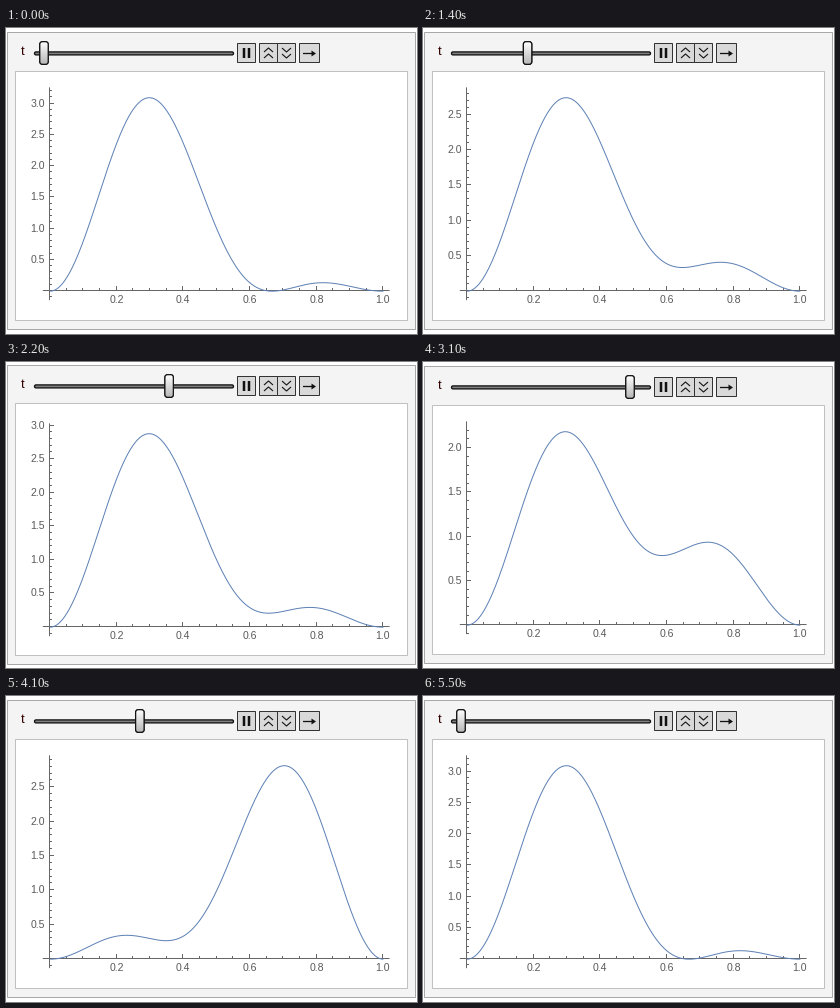
Write a matplotlib script that moves like this. It is 411x306 px and loops after 6000 ms.

```python
import math

import matplotlib.pyplot as plt
import numpy as np
from matplotlib.animation import FuncAnimation
from matplotlib.patches import FancyBboxPatch, Rectangle

# Lines already sit on pixel centres, so snapping would only move them.
plt.rcParams["path.snap"] = False

W, H, DPI = 411, 306, 64
PT = 72 / DPI                      # points per pixel

FRAMES, STEP_MS = 60, 100
HOLD = 4                           # still steps before the motion starts
STEPS = 51                         # moving steps, out and back

X0, Y0 = 43.5, 262.5               # plot origin in pixels
X_SCALE, PEAK = 333.4, 193.5       # pixels per unit of x, height of the curve
PAD = 0.05 * PEAK
CURVE_DX, CURVE_DY = 0.5, 0.7      # the curve is not aligned to the pixel grid

GREY, TEXT, CURVE, INK = "#666666", "#5a5a5a", "#5e81b5", "#111111"

fig = plt.figure(figsize=(W / DPI, H / DPI), dpi=DPI, facecolor="white")
ax = fig.add_axes([0, 0, 1, 1])
xs = np.linspace(0, 1, 401)


def slider_value(frame):
    """Position of the slider from 0 to 1; it runs out and back once."""
    k = frame - HOLD
    if not 0 < k < STEPS:
        return 0.0
    return (min(k, STEPS - k) - 0.9) / 24.6


def density(u):
    """Two lowest box states beating three times along the slider."""
    a, b = np.sin(np.pi * xs), np.sin(2 * np.pi * xs)
    return a**2 + b**2 + 2 * a * b * math.cos(6 * math.pi * u)


def line(x, y, color=GREY, width=1.0):
    ax.plot(x, y, color=color, lw=width * PT, solid_capstyle="butt")


def box(x0, y0, x1, y1, face, edge):
    ax.add_patch(Rectangle((x0, y0), x1 - x0, y1 - y0, fc=face, ec=edge, lw=PT))


def pill(x0, y0, x1, y1, radius, face, width, zorder=1):
    patch = FancyBboxPatch((x0, y0), x1 - x0, y1 - y0,
                           boxstyle=f"round,pad=0,rounding_size={radius}",
                           fc=face, ec=INK, lw=width * PT, zorder=zorder)
    return ax.add_patch(patch)


def label(x, y, text, size=10.5, color=TEXT, ha="center"):
    ax.text(x, y, text, fontsize=size * PT, color=color, ha=ha,
            va="baseline", family="Liberation Sans")


def pixel(v):
    return math.floor(v) + 0.5


def draw_slider(u, dy):
    label(15, 27 + dy, "t", 13, "#330000", "left")
    pill(28.5, 23.9 + dy, 227.5, 26.9 + dy, 1.5, "#808080", 1.3)
    cx = 38 + 180 * u
    left, right, top, bottom = cx - 4.2, cx + 4.2, 13.7 + dy, 36.3 + dy
    thumb = pill(left, top, right, bottom, 2.6, "#dddddd", 1.2, 3)
    shade = ax.imshow(np.linspace(1, 0.72, 24)[:, None], cmap="gray", vmin=0,
                      vmax=1, extent=(left, right, bottom, top),
                      aspect="auto", zorder=3.1)
    shade.set_clip_path(thumb)
    pill(left, top, right, bottom, 2.6, "none", 1.2, 3.2)


def draw_buttons(dy):
    for x0, x1 in ((231.5, 249.5), (253.5, 271.5), (271.5, 289.5), (293.5, 313.5)):
        box(x0, 15.5 + dy, x1, 34.5 + dy, "#d9d9d9", "#333333")
    mid = 25 + dy
    for x in (238, 243):
        line([x, x], [mid - 5, mid + 5], INK, 2.5)
    for cx, sign in ((262.5, 1), (280.5, -1)):
        for cy in (mid - 3, mid + 3):
            line([cx - 4.5, cx, cx + 4.5],
                 [cy + 2 * sign, cy - 2 * sign, cy + 2 * sign], INK, 1.1)
    line([297, 307], [mid + 0.5, mid + 0.5], INK, 1.3)
    ax.fill([305.5, 310, 305.5], [mid - 2.5, mid + 0.5, mid + 3.5],
            color=INK, lw=0)


def draw_plot(values, y0, scale):
    top, bottom = y0 - PEAK - PAD, y0 + PAD
    line([X0 - 6.7, X0 + 1.02 * X_SCALE], [y0, y0])
    line([X0, X0], [top, bottom])

    for i in range(21):
        x = pixel(X0 + i * 0.05 * X_SCALE)
        major = i % 4 == 0
        line([x, x], [y0, y0 - (4.5 if major else 2.5)])
        if major and i:
            label(x, y0 + 12.5, f"{i / 20:.1f}")

    first = -math.floor(PAD / scale * 10)
    last = math.floor((PEAK + PAD) / scale * 10)
    for i in range(first, last + 1):
        y = pixel(y0 - i * 0.1 * scale)
        major = i % 5 == 0
        line([X0, X0 + (4.5 if major else 2.5)], [y, y])
        if major and i:
            label(39, y + 3.5, f"{i / 10:.1f}", ha="right")

    line(X0 + CURVE_DX + xs * X_SCALE, y0 + CURVE_DY - values * scale, CURVE)


def draw(frame):
    ax.clear()
    ax.axis("off")
    u = slider_value(frame)
    values = density(u)
    scale = PEAK / values.max()

    # A label close to the axis end makes the panel a little taller.
    room = (PEAK + PAD) % (0.5 * scale)
    grow = max(0, round((6.65 - room) / 2))
    outer = max(0, grow - 1)

    box(1.5, 4.5 - outer, 409.5, 301.5 + outer, "#f4f4f4", "#a8a8a8")
    box(9.5, 43.5 - grow, 401.5, 292.5 + outer, "white", "#c0c0c0")
    draw_slider(u, -outer)
    draw_buttons(-outer)
    draw_plot(values, Y0 + grow, scale)
    ax.set_xlim(0, W)
    ax.set_ylim(H, 0)
    return []


anim = FuncAnimation(fig, draw, frames=FRAMES, interval=STEP_MS,
                     init_func=lambda: draw(0), repeat=True, repeat_delay=0,
                     blit=False)
plt.show()
```
